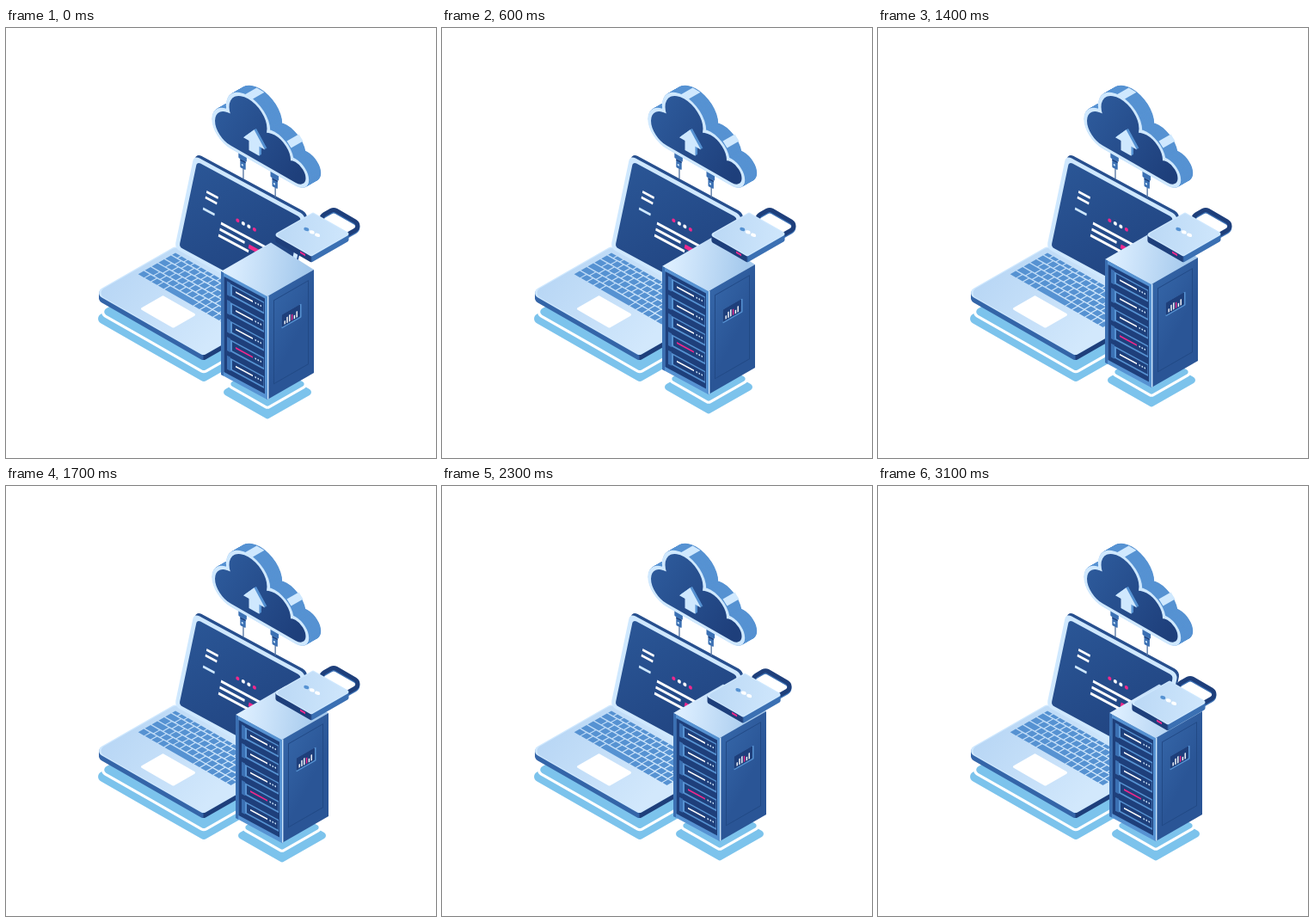
Write an HTML page with a canvas that moves like this. It is 500x500 px and loops after 3200 ms.

```html
<!DOCTYPE html>
<html lang="en">
<head>
<meta charset="utf-8">
<title>Cloud backup</title>
<style>
html, body { margin: 0; width: 100%; height: 100%; overflow: hidden; background: #fff; }
canvas { display: block; width: 500px; height: 500px; }
</style>
</head>
<body>
<canvas id="stage" width="500" height="500"></canvas>
<script>
const ctx = document.getElementById('stage').getContext('2d');
const LOOP = 3200, STEP = 100;
const SLOPE = 0.572; // rise of the isometric axes
const C = {
  navy: '#1e3f7b', deep: '#274f8e', mid: '#3b70b3', blue: '#5692d2',
  pale: '#cfe8fe', shade: '#7cc3ec', pink: '#f0288c', white: '#fff'
};

function grad(x1, y1, x2, y2, ...colors) {
  const g = ctx.createLinearGradient(x1, y1, x2, y2);
  colors.forEach((c, i) => g.addColorStop(i / (colors.length - 1), c));
  return g;
}

// Two flat colours that meet at x.
function split(x, left, right) {
  return grad(x - 1, 0, x + 1, 0, left, right);
}

function rect(x, y, w, h, color, r = 0) {
  ctx.beginPath();
  ctx.roundRect(x, y, w, h, r);
  ctx.fillStyle = color;
  ctx.fill();
}

function plane(x, y, slope, lean, draw) {
  ctx.save();
  ctx.transform(1, slope, lean, 1, x, y);
  draw();
  ctx.restore();
}

const at = (x, y, draw) => plane(x, y, 0, 0, draw);

// Floor rectangle from its left corner: u runs to the front, v to the back.
function floorPath(x, y, u, v, r) {
  const corners = [[u, 0], [u, v], [0, v], [0, 0]]
    .map(([a, b]) => [x + a + b, y + (a - b) * SLOPE]);
  ctx.beginPath();
  ctx.moveTo(x + u / 2, y + u / 2 * SLOPE);
  corners.forEach((p, i) => ctx.arcTo(...p, ...corners[(i + 1) % 4], r));
  ctx.closePath();
}

function floor(x, y, u, v, color, r = 0) {
  floorPath(x, y, u, v, r);
  ctx.fillStyle = color;
  ctx.fill();
}

function outline(color, w) {
  ctx.strokeStyle = color;
  ctx.lineWidth = w;
  ctx.stroke();
}

function slab(x, y, u, v, h, left, right, top, r) {
  const side = split(x + u, left, right);
  for (let i = h; i > 0; i--) floor(x, y + i, u, v, side, r);
  floor(x, y, u, v, C.pale, r);
  floor(x + 2.5, y, u - 2.5, v - 2.5, top, r);
}

// Two stacked bands with a white gap.
function shadow(x, y, u, v, inset, lift, r) {
  floor(x, y, u, v, C.shade, r);
  floorPath(x + inset, y - lift, u - inset, v - inset, r * 0.7);
  outline(C.white, 6.4);
  ctx.fillStyle = C.shade;
  ctx.fill();
}

function keyboard() {
  const width = 109, rows = 6;
  ctx.save();
  ctx.transform(1, SLOPE, -1, SLOPE, 197, 261.5);
  for (let row = 0, v = 0; row < rows; row++) {
    const h = row ? 6.5 : 3.8;
    for (let u = 0, i = 0; u < width - 2; i++) {
      const space = row === rows - 1 && i === 4;
      const w = Math.min(space ? 34 : i ? 7.6 : 7 + row * 5 % 8, width - u);
      rect(u, v, w - 1.2, h, C.blue);
      u += w;
    }
    v += h + 1.4;
  }
  ctx.restore();
}

function screen() {
  const w = 130, h = 108, slope = 0.54, lean = -0.21;
  plane(198.5, 253.5, slope, lean, () => rect(0, -h, w, h, C.deep, 6));
  plane(196, 256, slope, lean, () => {
    rect(0, -h, w, h, C.pale, 6);
    rect(4.5, 5 - h, w - 9, h - 9, grad(0, -h, w, 0, '#2b5797', C.navy), 4);
    [77, 70.5, 57.5].forEach((y, i) =>
      rect(21, -y - 1.4, 13.5, 2.8, i < 2 ? C.white : C.pale));
    for (let i = 0; i < 4; i++) {
      rect(57.8 + i * 6.5, -66.5, 4, 4, i % 3 ? C.white : C.pink, 2);
    }
    [52, 29, 35].forEach((len, i) => rect(43, -53.8 + i * 7, len, 3, C.white));
    rect(77, -46, 12, 4.4, C.pink);
  });
}

function laptop() {
  shadow(101, 338, 129, 97, 9, 8, 6);
  slab(102, 308, 127.5, 95, 6, '#3465a8', C.navy,
    grad(130, 285, 235, 370, '#b9d7f5', '#d2e8fc'), 6);
  screen();
  keyboard();
  floor(155.5, 326.5, 39, 27, C.white, 1.5);
}

// A flat cloud: four circles on a straight base.
function cloudShape(pad, color) {
  const base = 126;
  ctx.beginPath();
  for (const [x, y, r] of [[19, 107.5, 18.5], [39, 82, 22], [70, 103, 18.5], [94, 114, 12]]) {
    ctx.moveTo(x, y);
    ctx.arc(x, y, r + pad, 0, Math.PI * 2);
  }
  ctx.rect(19, 104, 75, base - 104 + pad);
  ctx.fillStyle = color;
  ctx.fill();
}

function arrow(color) {
  const x = 46, top = 92, half = 12.5;
  ctx.beginPath();
  ctx.moveTo(x, top);
  ctx.lineTo(x + half, top + 16);
  ctx.lineTo(x - half, top + 16);
  ctx.fillStyle = color;
  ctx.fill();
  rect(x - 6, top + 15, 12, 12, color);
}

// Repeats a flat shape backwards to give it depth.
function extrude(depth, draw) {
  for (let i = depth * 2; i > 0; i--) at(i / 2, -i * 0.286 - i / 2 * SLOPE, draw);
}

function plug(x, y) {
  plane(x, y, 0.5, 0, () => {
    rect(0, 12, 1.3, 13, '#50719f');
    rect(-5, -3, 9.6, 6.5, C.mid, 1);
    rect(-3, 3, 6.4, 10.5, C.mid, 1);
    rect(-3, 4, 6.4, 1.5, C.navy);
    rect(-1.5, 8.5, 2, 2, C.pale);
  });
}

function cloud() {
  plug(275.3, 150);
  plug(312.5, 172);
  plane(242.5, 0, SLOPE, 0, () => {
    extrude(14, () => cloudShape(3.7, C.blue));
    // Two glints on the rim, along the depth axis.
    ctx.save();
    ctx.transform(1, 0, 1, -2 * SLOPE, 0, 0);
    ctx.restore();
    for (const [x, y, w, drop] of [[35, 57.5, 9, 0], [84, 83.5, 5, 5]]) {
      ctx.beginPath();
      ctx.moveTo(x, y);
      ctx.lineTo(x + w, y + drop);
      ctx.lineTo(x + w + 14, y + drop - 16);
      ctx.lineTo(x + 14, y - 16);
      ctx.fillStyle = C.pale;
      ctx.fill();
    }
    cloudShape(3.7, C.pale);
    cloudShape(0, grad(10, 80, 95, 120, '#2d5a9b', C.navy));
    extrude(2.5, () => arrow(C.blue));
    arrow(C.pale);
  });
}

function bay(y, color) {
  rect(7, y, 4, 16, C.mid);
  rect(11, y + 1, 39, 14, C.blue);
  rect(13, y + 2.6, 36.5, 10.4, C.navy);
  rect(17, y + 6.6, 20, 1.8, color);
  for (let i = 0; i < 3; i++) rect(39.5 + i * 3, y + 6.6, 1.5, 1.8, C.pale);
}

function tower() {
  const height = 120;
  shadow(249, 423.5, 55, 55, 9.5, 9.5, 4);

  ctx.beginPath();
  [[250, 283], [308, 249.5], [358, 281], [304, 313]].forEach(p => ctx.lineTo(...p));
  ctx.fillStyle = grad(260, 275, 350, 285, '#dceeff', '#a3c8ec');
  ctx.fill();

  plane(250, 283, 0.54, 0, () => {
    rect(0, 0, 54.5, height, C.blue);
    rect(0, 0, 3, height, C.mid);
    rect(3.5, 4, 47.5, height - 9, C.navy);
    for (let i = 0; i < 5; i++) bay(7.5 + i * 21.6, i === 3 ? C.pink : C.white);
  });

  plane(304, 312, -SLOPE, 0, () => {
    rect(0, 0, 54, height, grad(0, 0, 54, 40, '#3566a8', '#2a5596'));
    ctx.beginPath();
    ctx.rect(7.5, 9, 40, 97);
    outline('#214985', 1);
    rect(16.5, 31, 23, 16, C.blue, 1);
    rect(16.5, 31, 21.5, 14.5, C.navy, 1);
    for (let i = 0; i < 6; i++) {
      const h = 4 + 4 * Math.abs(Math.sin(i * 0.8));
      rect(19.5 + i * 2.8, 44 - h, 1.4, h, i === 3 ? C.pink : C.white);
    }
    rect(0, 0, 1.4, height, C.pale);
  });
}

function padlock() {
  floorPath(361, 223.5, 34, 20, 6);
  outline(C.mid, 5);
  floorPath(361, 222, 34, 20, 6);
  outline(C.navy, 5);
  slab(311, 240.5, 44, 46, 7, C.navy, C.mid,
    grad(325, 235, 390, 245, '#bddaf6', '#cde5fb'), 2.5);
  plane(342, 259.5, SLOPE, 0, () => rect(0, 0, 6, 2.2, C.pink));
  for (let i = 0; i < 3; i++) {
    plane(349.3 + i * 6.4, 234 + i * 3.4, 0.2, 0, () =>
      rect(-3, -2, 6, 4, i ? C.white : C.blue, 2));
  }
}

// The tower rises first, then the padlock slides onto it.
function render(ms) {
  const step = Math.floor((ms % LOOP) / STEP);
  const rise = Math.min(step, 19);
  const slide = Math.max(0, step - 20) / 11;
  rect(0, 0, 500, 500, C.white);
  laptop();
  cloud();
  at(rise, -rise, tower);
  at(-18 * slide, 12 * slide, padlock);
}

const start = performance.now();
function tick() {
  render(performance.now() - start);
  requestAnimationFrame(tick);
}
tick();
</script>
</body>
</html>
```
